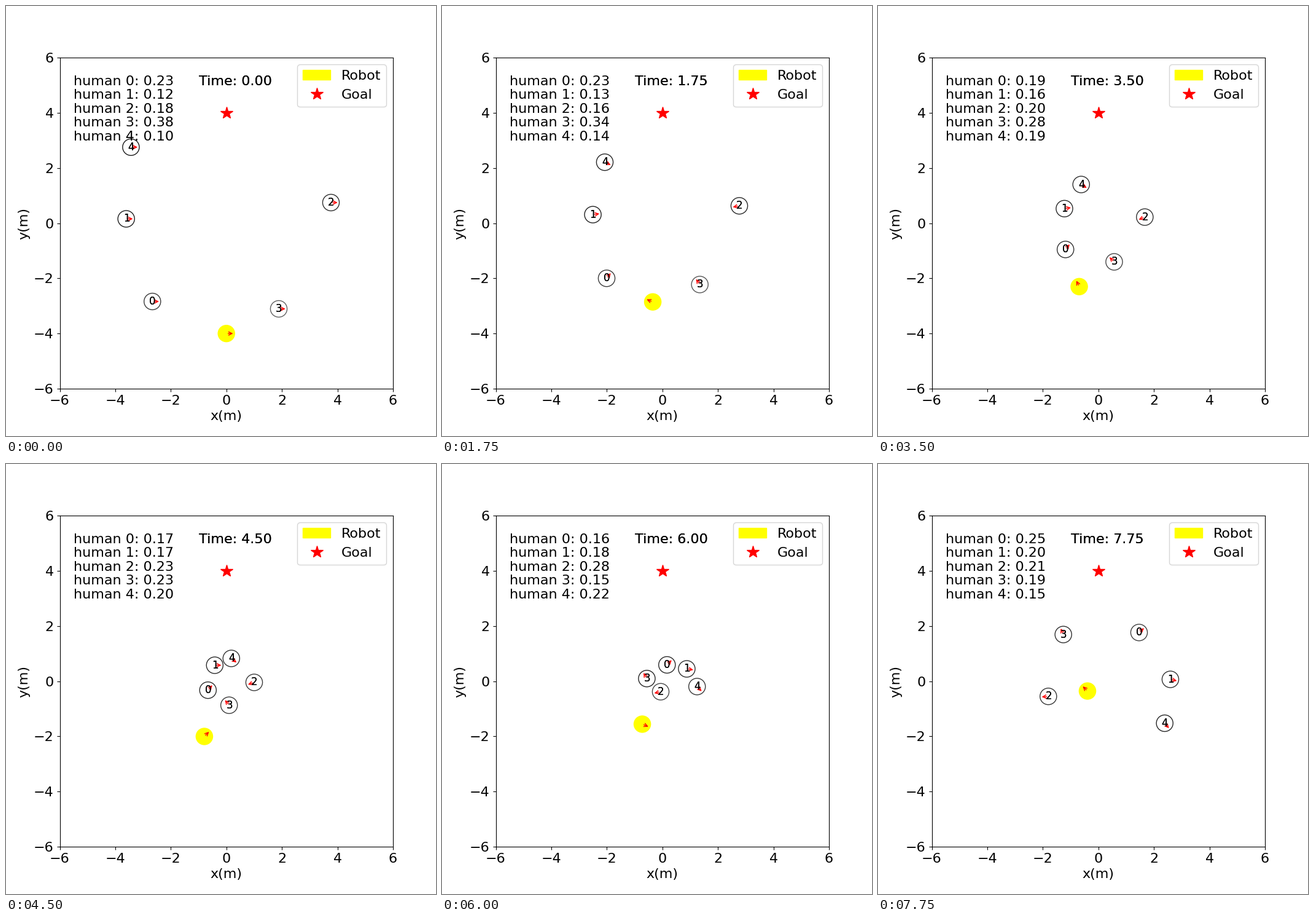
Animation of 700x700 px, one loop 8000 ms. Source, as a matplotlib script:

```python
import numpy as np
import matplotlib.pyplot as plt
from matplotlib.animation import FuncAnimation
from matplotlib.lines import Line2D
from matplotlib.patches import ArrowStyle, Circle, FancyArrowPatch

STEP = 0.25      # seconds per frame
FRAMES = 32
RADIUS = 0.3
OFFSET = 0.11    # shift of a number from its circle's centre

# Each walker crosses the room through a few points: x, y, attention score
KEY_TIMES = np.array([0, 1.75, 4.5, 6, 7.75])
WALKERS = np.array([
    [(-2.665, -2.839, .23), (-2.007, -1.999, .23), (-0.663, -0.327, .17),
     (0.167, 0.590, .16), (1.465, 1.763, .25)],
    [(-3.607, 0.156, .12), (-2.503, 0.309, .134), (-0.419, 0.577, .17),
     (0.878, 0.445, .18), (2.593, 0.065, .20)],
    [(3.766, 0.746, .18), (2.770, 0.628, .16), (1.001, -0.045, .23),
     (-0.061, -0.383, .28), (-1.802, -0.552, .21)],
    [(1.886, -3.106, .38), (1.348, -2.224, .34), (0.098, -0.873, .23),
     (-0.560, 0.094, .15), (-1.262, 1.690, .19)],
    [(-3.436, 2.754, .10), (-2.074, 2.209, .144), (0.178, 0.824, .204),
     (1.249, -0.196, .22), (2.388, -1.525, .15)],
])

# The robot moves straight and turns at these points: time, x, y
TURNS = np.array([
    (0, 0, -4), (1.5, -0.16, -2.93), (1.75, -0.346, -2.854),
    (2.5, -0.441, -2.83), (2.75, -0.486, -2.718), (3.75, -0.758, -2.16),
    (4.25, -0.878, -2.09), (4.5, -0.793, -2.004), (5.75, -0.834, -1.512),
    (6, -0.723, -1.558), (6.75, -0.138, -1.108), (7, -0.138, -0.858),
    (7.5, -0.216, -0.535), (7.75, -0.393, -0.358),
])


def smooth(t, keys):
    """Cubic Hermite curve through the rows of keys at KEY_TIMES."""
    slopes = np.gradient(keys, KEY_TIMES, axis=0)
    k = np.clip(np.searchsorted(KEY_TIMES, t, side="right") - 1,
                0, len(KEY_TIMES) - 2)
    h = (KEY_TIMES[k + 1] - KEY_TIMES[k])[:, None]
    u = (t - KEY_TIMES[k])[:, None] / h
    v = 1 - u
    return (v ** 2 * ((1 + 2 * u) * keys[k] + u * h * slopes[k])
            + u ** 2 * ((1 + 2 * v) * keys[k + 1] - v * h * slopes[k + 1]))


def headings(path):
    """Direction of the step that led to each point; the first faces right."""
    dx, dy = np.diff(path, axis=0).T
    return np.concatenate([[0], np.arctan2(dy, dx)])


times = np.arange(FRAMES) * STEP
tracks = [smooth(times, keys) for keys in WALKERS]
robot_path = np.column_stack([np.interp(times, TURNS[:, 0], TURNS[:, c])
                              for c in (1, 2)])
paths = [robot_path] + [track[:, :2] for track in tracks]
angles = [headings(path) for path in paths]

fig, ax = plt.subplots(figsize=(7, 7), dpi=100)
ax.tick_params(labelsize=16)
ax.set_xlim(-6, 6)
ax.set_ylim(-6, 6)
ax.set_xlabel("x(m)", fontsize=16)
ax.set_ylabel("y(m)", fontsize=16)


def double_text(x, y, label, size):
    # Drawn twice for a slightly heavier look
    return [ax.text(x, y, label, fontsize=size) for _ in range(2)]


robot = ax.add_artist(Circle((0, -4), RADIUS, color="yellow"))
goal = ax.add_artist(Line2D([0], [4], color="red", marker="*",
                            linestyle="None", markersize=15))
ax.legend([robot, goal], ["Robot", "Goal"], fontsize=16, loc="upper right")

humans = [ax.add_artist(Circle((0, 0), RADIUS, fill=False)) for _ in tracks]
numbers = [double_text(0, 0, str(i), 12) for i in range(len(tracks))]
score_labels = [ax.text(-5.5, 5 - 0.5 * i, "", fontsize=16)
                for i in range(len(tracks))]
clock = double_text(-1, 5, "", 16)

head = ArrowStyle("->", head_length=4, head_width=2)
arrows = [ax.add_artist(FancyArrowPatch((0, 0), (1, 0), color="red",
                                        arrowstyle=head))
          for _ in paths]


def update(n):
    robot.center = robot_path[n]
    for i, track in enumerate(tracks):
        x, y, score = track[n]
        humans[i].center = x, y
        humans[i].set_edgecolor(str(score))
        for text in numbers[i]:
            text.set_position((x - OFFSET, y - OFFSET))
        score_labels[i].set_text(f"human {i}: {score:.2f}")
    for arrow, path, angle in zip(arrows, paths, angles):
        x, y = path[n]
        arrow.set_positions((x, y), (x + RADIUS * np.cos(angle[n]),
                                     y + RADIUS * np.sin(angle[n])))
    for text in clock:
        text.set_text(f"Time: {times[n]:.2f}")


anim = FuncAnimation(fig, update, frames=FRAMES, interval=250, repeat=True,
                     repeat_delay=0, init_func=lambda: update(0))
plt.show()
```
